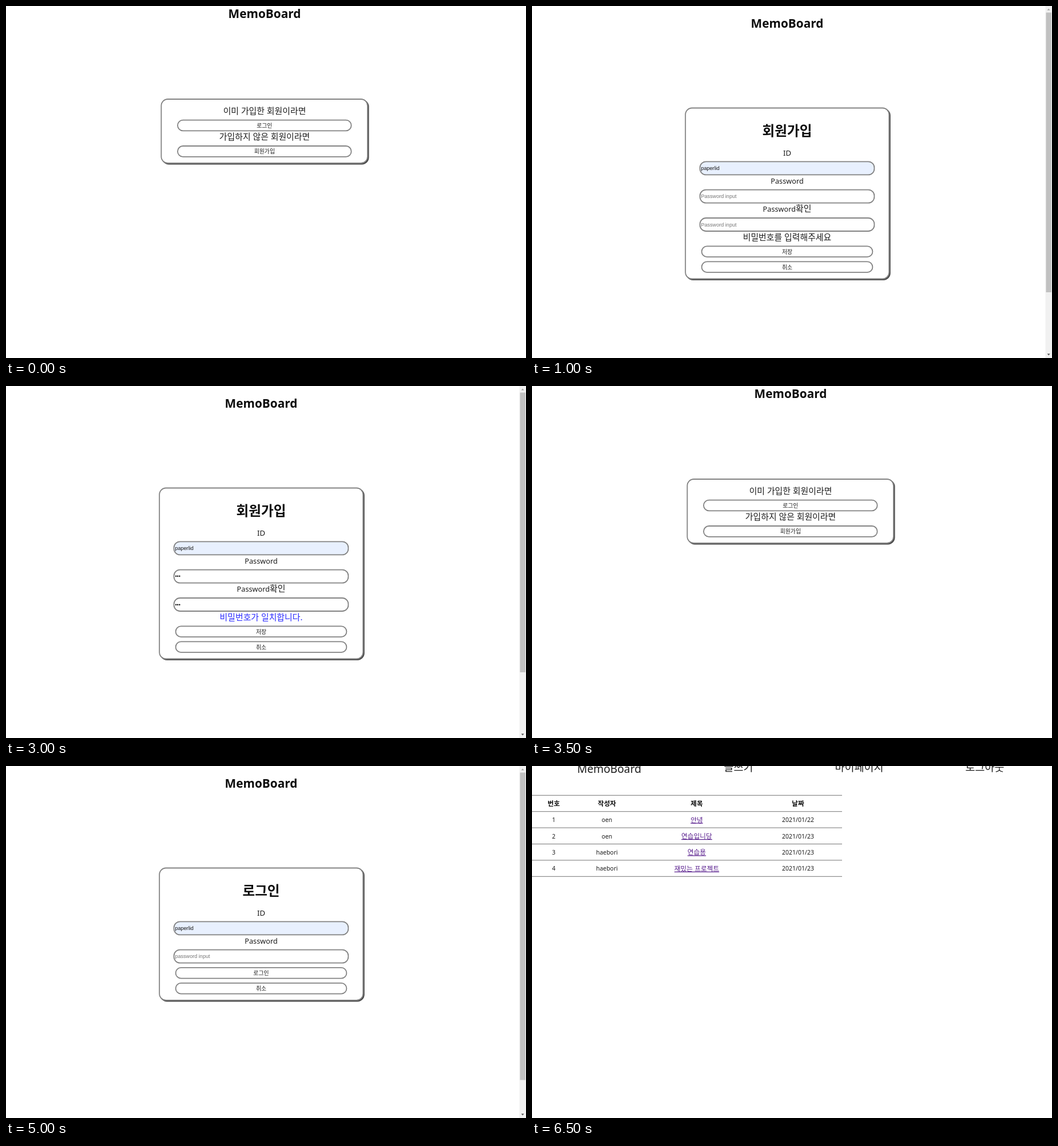
Recreate the animation shown at these times as an HTML page. Size 909 by 616 pixels, loop 7 s.

```html
<!DOCTYPE html>
<html lang="ko">
<head>
<meta charset="utf-8">
<title>MemoBoard</title>
<style>
html, body { margin: 0; width: 100%; height: 100%; overflow: hidden; background: #fff; }
svg { display: block; width: 100vw; height: 100vh; }
text { font-family: 'Noto Sans', 'Noto Sans CJK KR', 'Noto Sans CJK JP', sans-serif; white-space: pre; }
.field { font-family: 'Liberation Sans', Arial, sans-serif; }
</style>
</head>
<body>
<svg id="stage" viewBox="0 0 909 616"></svg>
<script>
const stage = document.getElementById('stage');
const STEP = 500;
const GRAY = '#828282', INK = '#1c1c1c';
const USER = 'paperlid';

const text = (x, y, size, str, extra = '') =>
  `<text x="${x}" y="${y}" font-size="${size}" text-anchor="middle" fill="${INK}" ${extra}>${str}</text>`;

const bold = (x, y, size, str) => text(x, y, size, str, 'font-weight="700" style="fill:#0c0c0c"');

const box = (x, y, w, h, r, stroke = GRAY, fill = '#fff') =>
  `<rect x="${x}" y="${y}" width="${w}" height="${h}" rx="${r}" fill="${fill}" stroke="${stroke}" stroke-width="1.8"/>`;

const card = (x, y, w, h) =>
  box(x + 1.6, y + 1.6, w, h, 11.5, '#4a4a4a', '#4a4a4a') + box(x, y, w, h, 11.5);

const button = (x, y, w, str) =>
  box(x, y, w, 18.8, 9.4) + text(x + w / 2, y + 13.1, 9.9, str);

// Single-line input: placeholder when empty, tinted when autofilled, dark ring when focused
function input(y, value, hint, { auto, focus } = {}) {
  return box(293.6, y, 304.8, 23, 10.5, GRAY, auto ? '#e8f0fe' : '#fff')
    + (focus ? `<rect x="293.6" y="${y - .3}" width="305" height="23.6" rx="1.5" fill="none" stroke="#141414" stroke-width="1.8"/>` : '')
    + `<text class="field" x="295.4" y="${y + 14.8}" font-size="9.1" fill="${value ? '#111' : '#757575'}">${value || hint}</text>`;
}

const scrollbar = end =>
  `<rect x="897.5" width="11.5" height="616" fill="#f1f1f1"/>
   <rect x="898.5" y="11.5" width="9.5" height="${end - 11.5}" fill="#c1c1c1"/>
   <path d="M900.6 7.4h5l-2.5 -2.8z" fill="#a3a3a3"/>
   <path d="M900.6 608.6h5l-2.5 2.8z" fill="#505050"/>`;

const dots = n => '•'.repeat(n);

function home() {
  return bold(452, 21, 20.8, 'MemoBoard')
    + card(271.4, 163, 360.6, 112)
    + text(452, 188.6, 14.9, '이미 가입한 회원이라면')
    + button(300, 199.6, 303.6, '로그인')
    + text(452, 234, 14.9, '가입하지 않은 회원이라면')
    + button(300, 245, 303.6, '회원가입');
}

// Frame shared by the two account forms
const form = (title, height, end) =>
  scrollbar(end)
  + bold(446, 38, 20.8, 'MemoBoard')
  + card(268.2, 178.5, 356, height)
  + bold(446, 227, 23.6, title)
  + text(446, 261.6, 13.2, 'ID')
  + text(446, 311, 12.7, 'Password');

const NOTES = {
  ask: ['비밀번호를 입력해주세요', INK],
  differ: ['비밀번호가 일치하지않습니다.', '#ff2a2a'],
  match: ['비밀번호가 일치합니다.', '#2a2aff']
};

function signup(id, first, second, note, focus) {
  const [str, color] = NOTES[note];
  return form('회원가입', 299, 501)
    + input(272.4, id, 'ID input', { auto: !!id })
    + input(321.6, dots(first), 'Password input', { focus: focus === 1 })
    + text(446, 360, 12.7, 'Password<tspan font-size="14.9">확인</tspan>')
    + input(371, dots(second), 'Password input', { focus: focus === 2 })
    + text(446, 409.6, 14.9, str, `style="fill:${color}"`)
    + button(296.6, 420.4, 298.8, '저장')
    + button(296.6, 447.4, 298.8, '취소');
}

function login(id, count) {
  return form('로그인', 231.4, 549.5)
    + input(272.4, id, 'ID input', { auto: id === USER })
    + input(321.6, dots(count), 'password input')
    + button(296.6, 352.8, 298.8, '로그인')
    + button(296.6, 379.8, 298.8, '취소');
}

const POSTS = [
  ['oen', '안녕', 22],
  ['oen', '연습입니당', 23],
  ['haebori', '연습용', 23],
  ['haebori', '재밌는 프로젝트', 23]
];
const COLS = [38, 131, 288, 465];

function board() {
  let out = text(135, 12.3, 19.2, 'MemoBoard')
    + text(361, 9, 18.5, '글쓰기')
    + text(572, 9, 18.5, '마이페이지')
    + text(791.5, 9, 18.5, '로그아웃');
  ['번호', '작성자', '제목', '날짜'].forEach((str, i) => out += bold(COLS[i], 70.3, 11.6, str));
  POSTS.forEach(([author, title, day], i) => {
    const y = 98.2 + i * 28.4;
    out += text(COLS[0], y, 10.4, i + 1)
      + text(COLS[1], y, 10.4, author)
      + text(COLS[2], y + .4, 11.7, title, 'text-decoration="underline" style="fill:#551a8b"')
      + text(COLS[3], y, 10.5, '2021/01/' + day);
  });
  for (let i = 0; i < 6; i++)
    out += `<rect y="${50.8 + i * 28.4}" width="542" height="1" fill="#747474"/>`;
  return out;
}

const scenes = [
  home(),
  signup('', 0, 0, 'ask'),
  signup(USER, 0, 0, 'ask'),
  signup(USER, 3, 0, 'ask', 1),
  signup(USER, 3, 1, 'differ', 2),
  signup(USER, 3, 3, 'match', 2),
  signup(USER, 3, 3, 'match'),
  home(),
  login(USER[0], 0),
  login(USER, 0),
  login(USER, 0),
  login(USER, 1),
  login(USER, 3),
  board()
];

let shown = -1;
function draw(now) {
  const i = Math.floor(now / STEP) % scenes.length;
  if (i !== shown) stage.innerHTML = scenes[shown = i];
}

const start = performance.now();
function tick() {
  draw(performance.now() - start);
  requestAnimationFrame(tick);
}
tick();
</script>
</body>
</html>
```
